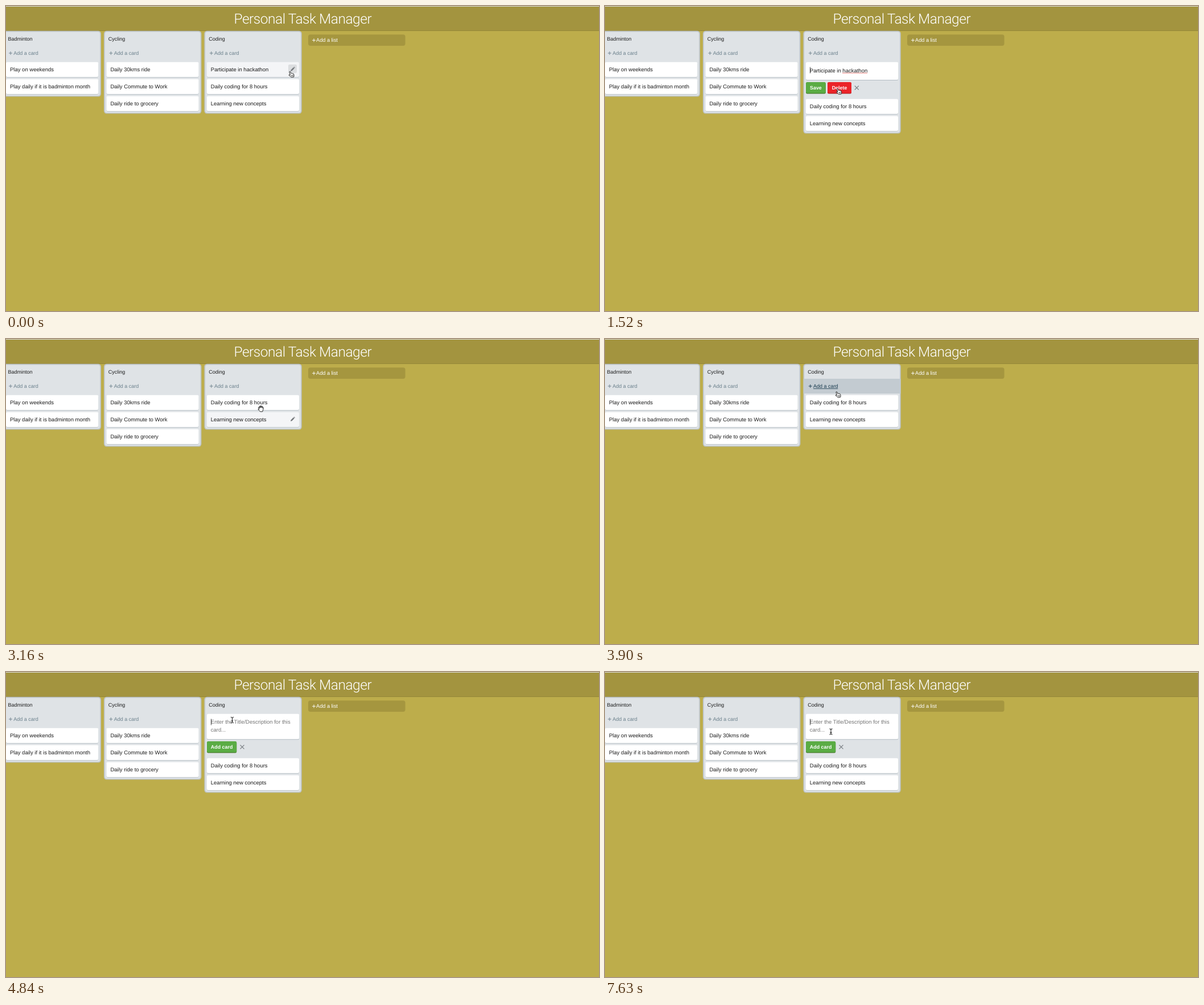
Recreate the animation shown at these times as an HTML page with a canvas. Size 1042 px wide and 537 px high, loop 8000 ms.

```html
<!DOCTYPE html>
<html lang="en">
<head>
<meta charset="utf-8">
<title>Personal Task Manager</title>
<style>
  html, body { margin: 0; width: 100%; height: 100%; overflow: hidden; background: #bdad4b; }
  canvas { display: block; width: 1042px; height: 537px; }
</style>
</head>
<body>
<canvas id="stage"></canvas>
<script>
const W = 1042, H = 537, LOOP = 8000;
const canvas = document.getElementById('stage');
const ctx = canvas.getContext('2d');
const dpr = window.devicePixelRatio || 1;
canvas.width = W * dpr;
canvas.height = H * dpr;

const SANS = '"Liberation Sans", Arial, sans-serif';
const INK = '#1d1d1d';
const CARD_GAP = 30;

const SHAPES = {
  point: new Path2D('M3 6.6L1.7 2Q1.6 .9 2.5 .8Q3.3 .8 3.6 1.8L4.5 4.3Q5.4 3.7 6 4.4Q7 3.8 7.6 4.6Q8.8 4.2 9.2 5.4L9.8 7.6Q10 9 9.2 10.7L5 11.1Q3.5 9.3 1.2 8Q.2 7 1.2 6.5Q2 6.2 3 7.2Z'),
  grab: new Path2D('M2.6 6.8L1.2 4.2Q1.1 3 2.1 3L3.6 5L3 1.8Q3.4 .5 4.4 1.2L5 4L5 1Q5.8 0 6.6 1L6.7 4L7.4 1.5Q8.4 .9 8.8 2L8.5 5L9 3.8Q10 3.3 10.1 4.5L9.3 8L8.4 11L4.4 11Q3 9 1 7.6Q.3 6.3 1.4 6.2Z'),
  knuckles: new Path2D('M5.3 7.2V9.3M6.7 7.2V9.3M8 7V9.2'),
  beam: new Path2D('M-2.2 -5Q0 -5 0 -3.6Q0 -5 2.2 -5M0 -4V4M-2.2 5Q0 5 0 3.6Q0 5 2.2 5M-1.2 1.5H1.2'),
  pencil: new Path2D('M0 8L.6 5.6L5 1.2L6.8 3L2.4 7.4ZM5.5 .7L6.2 0L8 1.8L7.3 2.5Z')
};

// Pointer moves: start, end, sampled steps, kind, from, to
const MOVES = [
  [0, 0, 1, 'point', [501.5, 120], [501.5, 120]],
  [150, 150, 1, 'point', [502, 120.5], [502, 120.5]],
  [620, 620, 1, 'beam', [501, 115.5], [501, 115.5]],
  [920, 1220, 3, 'beam', [488, 124], [434, 150]],
  [1370, 1520, 2, 'point', [417, 155], [411, 150]],
  [1820, 1820, 1, 'grab', [411, 149.5], [411, 149.5]],
  [2110, 2410, 3, 'grab', [415, 141], [431, 113]],
  [2560, 3010, 4, 'grab', [437, 120], [451, 155]],
  [3160, 3610, 4, 'grab', [447.5, 122.5], [420, 106]],
  [3750, 3900, 2, 'point', [414, 101], [409.5, 97.5]],
  [4040, 4190, 2, 'point', [403, 92], [399, 89]],
  [4340, 4340, 1, 'point', [399, 89.5], [399, 89.5]],
  [4840, 5170, 3, 'beam', [397.5, 84.5], [397, 105]]
];

// Board state changes: time, view, hovered card (or 'add'), pencil visible
const STATES = [
  [0, 'full', 0, true],
  [470, 'edit', -1, false],
  [1820, 'short', 1, false],
  [2110, 'short', 1, true],
  [2260, 'short', 0, true],
  [2710, 'short', 1, true],
  [3310, 'short', 0, true],
  [3750, 'short', 'add', false],
  [4670, 'compose', -1, false]
];

const CARET_FLIPS = [620, 1070, 1520, 1820, 4670, 5170, 5620, 6220, 6730, 7180, 7630];

const latest = (list, t) => list.filter(row => row[0] <= t).pop();

function box(x, y, w, h, r, fill) {
  ctx.beginPath();
  ctx.roundRect(x, y, w, h, r);
  ctx.fillStyle = fill;
  ctx.fill();
}

function text(str, x, mid, color = INK, size = 9.5, weight = 400) {
  ctx.font = `${weight} ${size}px ${SANS}`;
  ctx.fillStyle = color;
  ctx.fillText(str, x, mid + size * 0.34);
}

function line(x1, y1, x2, y2, color, width = 1) {
  ctx.beginPath();
  ctx.moveTo(x1, y1);
  ctx.lineTo(x2, y2);
  ctx.strokeStyle = color;
  ctx.lineWidth = width;
  ctx.stroke();
}

function raised(x, y, w, h, fill, shade) {
  box(x, y + 0.9, w, h, 2.2, shade);
  box(x, y, w, h, 2.2, fill);
}

const paper = (x, y, h, fill = '#fff') => raised(x, y, 162.3, h, fill, '#b3bcc2');

function button(label, x, y, w, fill, shade) {
  raised(x, y, w, 19.6, fill, shade);
  ctx.textAlign = 'center';
  text(label, x + w / 2, y + 10, '#fff', 8.9, 700);
  ctx.textAlign = 'left';
}

function cross(x, y) {
  line(x - 3.5, y - 3.5, x + 3.5, y + 3.5, '#7c8387', 1.1);
  line(x + 3.5, y - 3.5, x - 3.5, y + 3.5, '#7c8387', 1.1);
}

function plus(x, y, color) {
  line(x, y, x + 6, y, color, 0.9);
  line(x + 3, y - 3, x + 3, y + 3, color, 0.9);
}

function panel(x, bottom, title) {
  box(x - 0.4, 43.8, 171.4, bottom - 43.4, 5, '#c0c7cb');
  box(x + 1.4, 45.5, 167.8, bottom - 46.8, 3.6, '#dfe3e6');
  text(title, x + 7.4, 58, INK, 9);
}

function addLink(x, hover) {
  const color = hover ? '#17394d' : '#6b808c';
  if (hover) box(x, 70, 170.6, 26, 0, '#c3cbd1');
  plus(x + 9, 83, color);
  text('Add a card', x + 17.3, 83, color, 9);
  if (hover) line(x + 17.3, 87.5, x + 60.5, 87.5, color, 0.8);
}

function pencil(mid, boxed) {
  if (boxed) box(496, mid - 9, 15, 15, 2.2, '#dcdee0');
  ctx.save();
  ctx.translate(500, mid - 5.2);
  ctx.fillStyle = '#75797c';
  ctx.fill(SHAPES.pencil);
  ctx.restore();
}

function cards(x, mid, names, hover = -1) {
  names.forEach((name, i) => {
    const y = mid + i * CARD_GAP;
    paper(x + 4, y - 13.3, 26.2, i === hover ? '#f4f5f7' : '#fff');
    text(name, x + 11, y);
  });
}

function column(x, title, names, hover) {
  panel(x, 112 + (names.length - 1) * CARD_GAP + 17.2, title);
  addLink(x, hover === 'add');
  cards(x, 112, names, hover);
}

function squiggle(x1, x2, y) {
  ctx.fillStyle = '#e0322c';
  for (let x = x1; x < x2; x += 2) ctx.fillRect(x, y, 1.1, 1.1);
}

const CODING = ['Participate in hackathon', 'Daily coding for 8 hours', 'Learning new concepts'];
const REST = CODING.slice(1);
const X = 348.8;

const VIEWS = {
  full(t, hover) { column(X, 'Coding', CODING, hover); },
  short(t, hover) { column(X, 'Coding', REST, hover); },
  edit(t) {
    panel(X, 224.2, 'Coding');
    addLink(X, false);
    paper(353, 98.7, 31.3);
    text(CODING[0], 359.8, 113.3);
    if (t >= 620) squiggle(417.5, 461.5, 117.6);
    button('Save', 353, 134, 34.8, '#5aac44', '#3f6f21');
    button('Delete', 391, 134, 42, '#eb2429', '#a81c20');
    cross(442.3, 144);
    cards(X, 177, REST);
  },
  compose() {
    panel(X, 212.2, 'Coding');
    paper(353, 73.7, 44.6);
    text('Enter the Title/Description for this', 359.8, 88.2, '#757575');
    text('card...', 359.8, 101.4, '#757575');
    button('Add card', 353, 122, 52.2, '#5aac44', '#3f6f21');
    cross(415, 132);
    cards(X, 165, REST);
  }
};

function header() {
  ctx.fillStyle = '#bdad4b';
  ctx.fillRect(0, 0, W, H);
  ctx.fillStyle = '#a3943f';
  ctx.fillRect(0, 0, W, 44);
  ctx.fillStyle = '#dedfe0';
  ctx.fillRect(0, 0, W, 1);
  ctx.fillStyle = '#958738';
  ctx.fillRect(0, 43, W, 1);
  ctx.font = '300 24.6px Roboto, "Liberation Sans", sans-serif';
  ctx.letterSpacing = '-0.53px';
  ctx.textAlign = 'center';
  ctx.fillStyle = '#fff';
  ctx.fillText('Personal Task Manager', W / 2 + 0.3, 31.4);
  ctx.letterSpacing = '0px';
  ctx.textAlign = 'left';
}

function pointer(t) {
  const [t0, t1, n, kind, from, to] = latest(MOVES, t);
  const step = n > 1 ? Math.min(n - 1, Math.floor((t - t0) / (t1 - t0) * (n - 1) + 0.001)) : 0;
  const p = n > 1 ? step / (n - 1) : 0;
  const x = from[0] + (to[0] - from[0]) * p;
  const y = from[1] + (to[1] - from[1]) * p;
  ctx.save();
  ctx.lineJoin = ctx.lineCap = 'round';
  if (kind === 'beam') {
    ctx.translate(x, y);
    ctx.strokeStyle = '#fff';
    ctx.lineWidth = 2;
    ctx.stroke(SHAPES.beam);
    ctx.strokeStyle = '#111';
    ctx.lineWidth = 1;
  } else {
    ctx.translate(x - 5.2, y - 5.6);
    ctx.fillStyle = '#fff';
    ctx.fill(SHAPES[kind]);
    ctx.strokeStyle = '#111';
    ctx.lineWidth = 0.9;
    if (kind === 'point') {
      ctx.save();
      ctx.lineWidth = 0.6;
      ctx.stroke(SHAPES.knuckles);
      ctx.restore();
    }
  }
  ctx.stroke(SHAPES[kind]);
  ctx.restore();
}

function draw(t) {
  ctx.setTransform(dpr, 0, 0, dpr, 0, 0);
  ctx.textRendering = 'geometricPrecision';
  header();
  column(-4, 'Badminton', ['Play on weekends', 'Play daily if it is badminton month']);
  column(172.4, 'Cycling', ['Daily 30kms ride', 'Daily Commute to Work', 'Daily ride to grocery']);
  box(531, 50.3, 170.6, 19.6, 4, '#a5963f');
  plus(538, 60.3, '#fff');
  text('Add a list', 545, 60.3, '#fff', 9.2);

  const [, view, hover, showPencil] = latest(STATES, t);
  VIEWS[view](t, hover);
  if (showPencil) pencil(112 + hover * CARD_GAP, view === 'full');

  const caretOn = CARET_FLIPS.filter(flip => flip <= t).length % 2;
  if (caretOn && (view === 'edit' || view === 'compose')) {
    ctx.fillStyle = '#222';
    ctx.fillRect(360, view === 'edit' ? 107.5 : 82.5, 0.8, 11);
  }
  pointer(t);
}

function loop() {
  draw(performance.now() % LOOP);
  requestAnimationFrame(loop);
}
loop();
</script>
</body>
</html>
```
